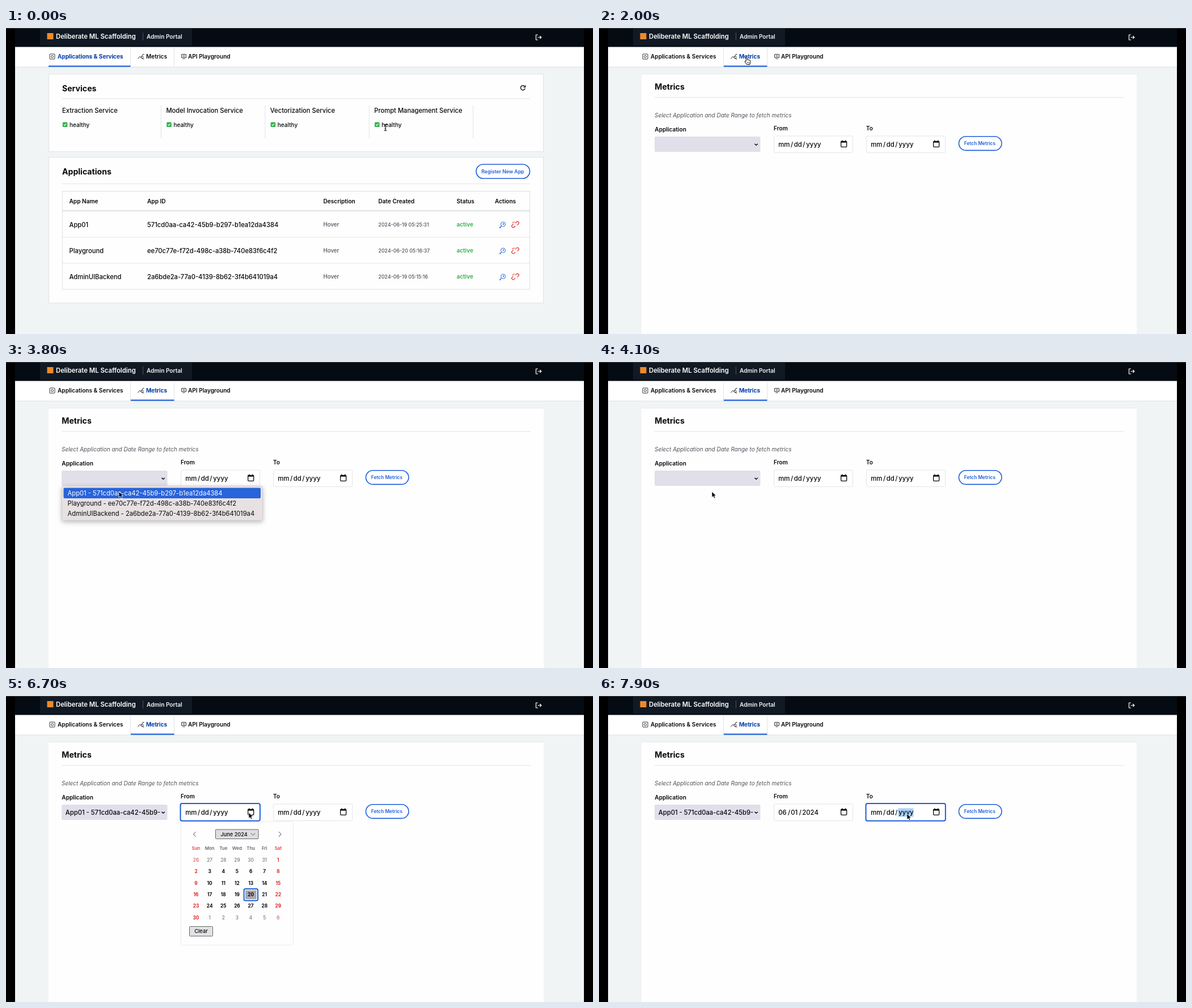
An HTML page that plays this animation: 1035 px wide and 541 px high, repeating every 8000 ms.

```html
<!DOCTYPE html>
<html lang="en">
<head>
<meta charset="utf-8">
<title>Admin Portal</title>
<style>
html, body { margin: 0; height: 100%; overflow: hidden; background: #000 }
svg { display: block; width: 100vw; height: 100vh }
text { font-family: Inter, sans-serif; white-space: pre }
</style>
</head>
<body>
<svg id="stage" viewBox="0 0 1035 541"></svg>
<script>
const BLUE = '#1f5fdc', INK = '#06080b', GRAY = '#50535a', RULE = '#e0e3e6', RED = '#e02626';
const LOOP = 8000, STEP = 100;

const text = (x, y, str, size = 11.2, weight = 450, fill = INK, extra = '') =>
  `<text x="${x}" y="${y}" font-size="${size}" font-weight="${weight}" fill="${fill}" ${extra}>${str}</text>`;
const bold = (x, y, str, size = 10.1, fill = INK) => text(x, y, str, size, 640, fill);
const heading = (x, y, str) => text(x, y, str, 14.1, 700);
const mid = (x, y, str, size, weight, fill) => text(x, y, str, size, weight, fill, 'text-anchor="middle"');
const rect = (x, y, w, h, fill, stroke = 'none', r = 0, sw = 1) =>
  `<rect x="${x}" y="${y}" width="${w}" height="${h}" rx="${r}" fill="${fill}" stroke="${stroke}" stroke-width="${sw}"/>`;
const path = (d, stroke = INK, sw = 1, fill = 'none') =>
  `<path d="${d}" fill="${fill}" stroke="${stroke}" stroke-width="${sw}" stroke-linejoin="round"/>`;
const at = (x, y, body) => `<g transform="translate(${x} ${y})">${body}</g>`;
const layer = (id, body) => `<g id="${id}">${body}</g>`;
const pill = (x, y, w, h, label, labelX, size) =>
  rect(x, y, w, h, '#fff', BLUE, h / 2, 1.6) + bold(labelX, y + h / 2 + 3.1, label, size, BLUE);

const apps = [
  ['App01', '571cd0aa-ca42-45b9-b297-b1ea12da4384', '2024-06-19 05:25:31'],
  ['Playground', 'ee70c77e-f72d-498c-a38b-740e83f6c4f2', '2024-06-20 05:16:37'],
  ['AdminUIBackend', '2a6bde2a-77a0-4139-8b62-3f4b641019a4', '2024-06-19 05:15:16'],
];

function frame() {
  return rect(16, 0, 1003, 541, '#f1f4f5') + rect(16, 33, 1003, 36, '#fff') +
    rect(16, 0, 1003, 33.5, '#050b12') + rect(60, 0, 268, 31, '#111a24') +
    rect(0, 0, 1035, 1, '#3a3d40') +
    rect(72.5, 9, 11, 11, '#ee8a2c') +
    bold(88, 19, 'Deliberate ML Scaffolding', 11.3, '#fff') +
    path('M241.5 8v14', '#4a525c') + bold(248, 18.6, 'Admin Portal', 10.1, '#f4f5f6') +
    path('M938 12h-3.5v9h3.5M937.5 16.500h6M941.300 14l2.500 2.500-2.500 2.500', '#fff', 1.2) +
    rect(16, 68.5, 1003, 1, '#dde0e3') +
    path('M219.5 35v33M296.5 35v33', RULE) +
    rect(77, 46, 9, 9, 'none', '#333', 1) +
    '<circle cx="81.5" cy="50.5" r="2" fill="none" stroke="#333"/>' +
    path('M232.5 54.500l3-4 2.500 1.500 4-6M240 54l3.500 1M241 46.500h2.500', '#333') +
    '<circle cx="240" cy="51.8" r="2" fill="none" stroke="#333"/>' +
    rect(309.5, 46.5, 8, 6, 'none', '#333', .5) +
    path('M311.5 48.500h4M311.500 50.500h4M311.500 54.500h4', '#333', .8) +
    bold(321, 54.2, 'API Playground');
}

function tab(id, x, w, label, labelX) {
  return bold(labelX, 54.2, label) +
    layer(id, bold(labelX, 54.2, label, 10.1, BLUE) + rect(x, 66.5, w, 2.2, BLUE));
}

function home() {
  const services = ['Extraction', 'Model Invocation', 'Vectorization', 'Prompt Management'];
  const columns = [[111.5, 'App Name'], [249, 'App ID'], [559.5, 'Description'],
    [656.5, 'Date Created'], [794.5, 'Status'], [862, 'Actions']];
  const key = '<circle cx="1.5" cy="-1" r="4" fill="none" stroke="#2d68cf"/>' +
    '<circle cx="2" cy="-1.5" r="1.2" fill="#2d68cf"/>' + path('M-1.5 2l-3.500 3.500M-4 4l1.500 1.500', '#2d68cf', 1.2);
  const unlink = path('M0-2.5l2-2a2.400 2.400 0 0 1 3.500 3.500l-2 2M0 2.500l-2 2a2.400 2.400 0 0 1-3.500-3.500l2-2' +
    'M-5.5-3.500l2 .5M-2.500-5.500l.5 2', RED, 1.1);
  return rect(75.5, 81.5, 872, 137, '#fefefe', RULE) + heading(99, 112, 'Services') +
    path('M914.5 103.200a4 4 0 1 0 .8 3.500M915.700 101.500v3h-3', INK, 1.3) +
    path('M99 124.8H924', RULE) +
    services.map((name, i) => at(99 + i * 183.4, 0,
      text(0, 150, name + ' Service') + rect(.8, 166.5, 8.6, 8.4, '#35b24a', 'none', 1.5) +
      path('M3 170.6l1.600 1.700 2.800-3.300', '#fff', 1.1) +
      text(13, 174.6, 'healthy', 10) + path('M174.5 137v58', RULE))).join('') +
    rect(75.5, 228.5, 872, 257.5, '#fefefe', RULE) + heading(99, 259, 'Applications') +
    pill(829, 241, 94.5, 25, 'Register New App', 838.3, 8.7) +
    path('M99 275.5H924', RULE) + rect(99.5, 288.5, 824, 173.5, 'none', '#dcdfe2') +
    path('M99 323.3H924', '#d3d6da', 1.6) + path('M99 370H924M99 416H924', RULE) +
    columns.map(([x, name]) => bold(x, 310.2, name)).join('') +
    apps.map(([name, id, date], i) => at(0, 347.5 + i * 46.1,
      text(111.5, 4, name) + text(249, 4, id) + text(559.5, 3.5, 'Hover', 9.7, 450, GRAY) +
      text(656.5, 3, date, 8.8, 500, GRAY) + bold(794.5, 3.6, 'active', 10, '#2fae45') +
      at(875, .5, key) + at(898, 0, unlink))).join('');
}

const dateText = (x, parts, starts) =>
  parts.map((part, i) => text(x + starts[i], 210, part, 11.4)).join('');

function dateField(x, content) {
  return rect(x + .5, 191, 139, 29.5, '#fff', '#e2e4e8', 2) + content +
    rect(x + 118.7, 200.5, 10, 9.8, 'none', INK, 1.2, 1.3) + rect(x + 118.5, 200, 10.5, 2.6, INK) +
    path(`M${x + 120.7} 198.5v2M${x + 126.7} 198.5v2`, INK, 1.4);
}

const blankDate = x => dateText(x, ['mm', '/', 'dd', '/', 'yyyy'], [8.2, 30, 35.7, 51.3, 57.3]);
const focusRing = (id, x) => layer(id, rect(x - .5, 190, 140.4, 30.8, 'none', BLUE, 3, 2));

function metrics() {
  return rect(75, 81, 873, 460, '#fefefe') + path('M75 81.5H948', '#e8ebed') +
    heading(98.3, 109, 'Metrics') + path('M98 122.8H925', RULE) +
    text(98, 157.6, 'Select Application and Date Range to fetch metrics', 10, 450, GRAY, 'font-style="italic"') +
    bold(98.3, 183.2, 'Application') + bold(308, 181.2, 'From') + bold(471, 181.2, 'To') +
    rect(98, 192, 186.5, 27, '#e0dfea', 'none', 2) + path('M274.5 204.700l2.700 2.600 2.700-2.600', INK, 1.4) +
    layer('choice', text(104.8, 210, 'App01 - 571cd0aa-ca42-45b9-', 11.25)) +
    dateField(308, layer('fromBlank', blankDate(308)) +
      layer('fromDate', dateText(308, ['06', '/', '01', '/', '2024'], [8.2, 25, 30.2, 44.8, 50.2]))) +
    dateField(471, layer('yearMark', rect(527.5, 198.5, 27, 15, '#a9d0fa')) + blankDate(471)) +
    pill(634.5, 191.8, 75.5, 24.6, 'Fetch Metrics', 643.8, 8.4);
}

function menu() {
  const row = (i, fill) => text(108.6, 235.8 + i * 18.2, apps[i][0] + ' - ' + apps[i][1], 11.2, 420, fill);
  return '<g style="filter:drop-shadow(0 3px 4px #0004)">' + rect(98.5, 219, 354, 61, '#e7e1e2', '#cfc9ca', 4, .7) + '</g>' +
    row(0) + row(1) + row(2) +
    layer('hover', rect(101.5, 222.5, 347.5, 18.5, '#2864da', 'none', 2) + row(0, '#fff'));
}

function calendar() {
  const colX = i => 335 + (i % 7) * 24.15, rowY = i => 290 + Math.floor(i / 7) * 20.35;
  const box = (id, i) => layer(id, rect(colX(i) - 12, rowY(i) - 10, 24.5, 20.6, '#fff', BLUE, 2.5, 2) +
    rect(colX(i) - 9.6, rowY(i) - 7.6, 19.7, 15.8, '#a9a9ab'));
  let out = rect(308.5, 222, 198, 218.5, '#fefefe', '#ececef', 3) +
    path('M334.5 240l-4 4.300 4 4.300M481 240l4 4.300-4 4.300', '#777', 1.1) +
    rect(369.5, 236, 75.5, 16.5, '#dedee0', '#66676a', 1) +
    text(378.5, 247.6, 'June 2024', 9.2, 500) + path('M431.5 242.500l4 3.800 4-3.800', '#555') +
    box('day20', 25) + box('day1', 6);
  'Sun Mon Tue Wed Thu Fri Sat'.split(' ').forEach((name, i) =>
    out += mid(colX(i), 272.4, name, 8, 450, i % 6 ? GRAY : RED));
  for (let i = 0; i < 42; i++) {
    const inMonth = i > 5 && i < 36, weekend = i % 7 % 6 === 0;
    const day = i < 6 ? 26 + i : inMonth ? i - 5 : i - 35;
    const fill = weekend ? (inMonth ? RED : '#e55b5b') : (inMonth ? INK : '#77797e');
    out += mid(colX(i), rowY(i) + 3, day, 8.3, inMonth ? 700 : 450, fill);
  }
  return out + rect(323.5, 407.5, 41, 17, '#e2e2e4', '#66676a', 1) + mid(344, 419.4, 'Clear', 9.3, 500);
}

const cursors =
  layer('arrow', path('M0 0V10.5L2.400 8.300 4.100 12 6 11.200 4.400 7.500H7.600Z', '#fff', .8, '#000')) +
  layer('hand', path('M-.8 1Q.3-.6 1.4 1V5L6 6Q7.400 6.600 7 8.600L6 13.500H.6L-3 8.600Q-3 6.600-.8 8Z', '#000', 1, '#fff') +
    path('M3 9v2.5M4.700 9v2.500M1.300 9v2.500', '#000', .6)) +
  layer('beam', path('M-2.5-5.500Q0-5.500 0-4Q0-5.500 2.500-5.500M0-4V4M-2.500 5.500Q0 5.500 0 4Q0 5.500 2.500 5.500M-1.500 2h3', '#222', 1.2));

const stage = document.getElementById('stage');
stage.innerHTML = frame() + tab('homeTab', 75, 144.5, 'Applications &amp; Services', 91) +
  tab('metricsTab', 220, 76.5, 'Metrics', 247) +
  layer('home', home()) +
  layer('metrics', metrics() + layer('menu', menu()) + layer('calendar', calendar()) +
    focusRing('fromRing', 308) + focusRing('toRing', 471)) +
  layer('cursor', cursors);

const parts = {};
stage.querySelectorAll('[id]').forEach(el => parts[el.id] = el);
const show = (id, visible) => parts[id].style.display = visible ? '' : 'none';

// Cursor trips: first step, last step, destination.
const trips = [[200, 700, 260, 51], [2600, 3100, 198, 204], [3400, 3800, 199, 229],
  [4900, 5700, 428, 206], [6800, 7200, 485, 285], [7500, 7900, 543, 208]];

function cursorAt(t) {
  let x = 669, y = 176;
  for (const [start, end, toX, toY] of trips) {
    const p = Math.min(1, Math.max(0, (t - start + STEP) / (end - start + STEP)));
    const ease = p * p * (3 - 2 * p);
    x += (toX - x) * ease;
    y += (toY - y) * ease;
  }
  return [x, y];
}

function render(now) {
  const t = Math.floor(now % LOOP / STEP) * STEP;
  const during = (from, to = LOOP) => t >= from && t < to;
  const [x, y] = cursorAt(t);
  const onMetrics = during(1900), picked = during(7400);
  const beam = during(0, 200), hand = during(900, 2600);

  show('home', !onMetrics);
  show('homeTab', !onMetrics);
  show('metrics', onMetrics);
  show('metricsTab', onMetrics);
  show('menu', during(3200, 4100));
  parts.menu.style.opacity = during(4000) ? .5 : 1;
  show('hover', y > 221);
  show('choice', during(4200));
  show('fromRing', during(5900, 7900));
  show('toRing', during(7900));
  show('yearMark', during(7900));
  show('calendar', during(6100, 7400));
  show('day20', during(0, 7300));
  show('day1', during(7300));
  show('fromBlank', !picked);
  show('fromDate', picked);
  show('beam', beam);
  show('hand', hand);
  show('arrow', !beam && !hand);
  parts.cursor.setAttribute('transform', `translate(${x} ${y})`);
}

function tick() {
  render(performance.now());
  requestAnimationFrame(tick);
}
tick();
</script>
</body>
</html>
```
